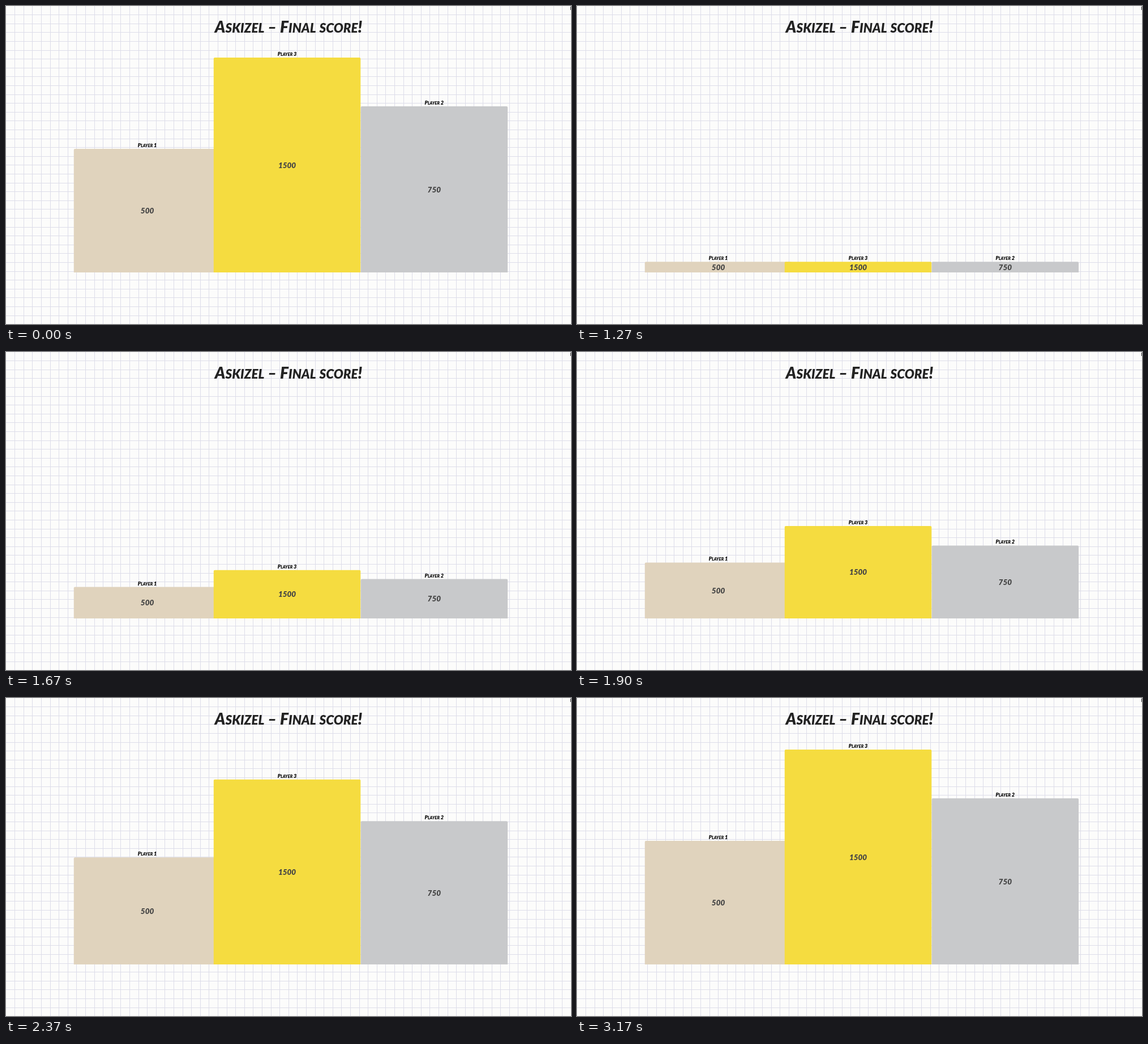
These frames come from a looping animation (998x561 px, 4400 ms). An HTML page:

```html
<!DOCTYPE html>
<html lang="en">
<head>
<meta charset="utf-8">
<title>Final score</title>
<style>
  html, body { margin: 0; width: 100%; height: 100%; overflow: hidden; background: #fcfcfb; }
  svg { display: block; width: 998px; height: 561px; }
  text {
    font-family: Lato, "Open Sans", sans-serif;
    font-weight: 900;
    font-style: italic;
    text-anchor: middle;
    white-space: pre;
  }
  .small { font-size: .8em; }
  .title { font-size: 28px; fill: #222; }
  .label { font-size: 9.2px; fill: #000; }
  .score { font-size: 13.5px; fill: #444; }
</style>
</head>
<body>
<svg id="stage" viewBox="0 0 998 561"></svg>
<script>
const LOOP = 4400;
const RESET = 1270;        // bars collapse here
const GROW_START = 1246;
const GROW_TIME = 1500;
const FLOOR = 470;
const MIN_HEIGHT = 18.5;
const BAR_WIDTH = 259.5;
const CELL = 15.6;

const players = [
  { name: 'Player 1', score: 500,  x: 119.8, height: 218, color: '#e0d3bd' },
  { name: 'Player 3', score: 1500, x: 366.8, height: 379, color: '#f5dc40' },
  { name: 'Player 2', score: 750,  x: 626.6, height: 293, color: '#c8c9cb' }
];

const stage = document.getElementById('stage');

function add(tag, attrs, content = '') {
  const el = document.createElementNS('http://www.w3.org/2000/svg', tag);
  for (const key in attrs) el.setAttribute(key, attrs[key]);
  el.innerHTML = content;
  return stage.appendChild(el);
}

// Lowercase runs become smaller capitals
const smallCaps = s =>
  s.replace(/[a-z]+/g, run => `<tspan class="small">${run.toUpperCase()}</tspan>`);

function drawGrid() {
  let d = '';
  for (let n = 1; n * CELL < 998; n++) {
    const p = Math.floor(n * CELL) + 0.5;
    d += `M${p} 0V561`;
    if (p < 561) d += `M0 ${p}H998`;
  }
  add('path', { d, stroke: '#dddde9', 'stroke-width': 1, fill: 'none' });
}

drawGrid();
add('rect', { x: 997, y: 1, width: 1, height: 6, fill: '#333' });
add('text', { class: 'title', x: 499, y: 47 }, smallCaps('Askizel – Final score!'));

for (const p of players) {
  const mid = p.x + BAR_WIDTH / 2;
  p.bar = add('path', { fill: p.color });
  p.label = add('text', { class: 'label', x: mid }, smallCaps(p.name));
  p.value = add('text', { class: 'score', x: mid }, String(p.score));
}

const barPath = (x, top) =>
  `M${x} ${FLOOR}V${top + 2}q0 -2 2 -2h${BAR_WIDTH - 4}q2 0 2 2V${FLOOR}z`;

function progress(t) {
  if (t < RESET) return 1;
  const u = Math.min(1, (t - GROW_START) / GROW_TIME);
  return (1 - Math.cos(Math.PI * u)) / 2;
}

function draw(t) {
  const k = progress(t);
  for (const p of players) {
    const h = MIN_HEIGHT + (p.height - MIN_HEIGHT) * k;
    const top = FLOOR - h;
    p.bar.setAttribute('d', barPath(p.x, top));
    p.label.setAttribute('y', top - 3);
    p.value.setAttribute('y', FLOOR - h / 2 + 5);
  }
}

const start = performance.now();
function tick() {
  draw((performance.now() - start) % LOOP);
  requestAnimationFrame(tick);
}
tick();
</script>
</body>
</html>
```
